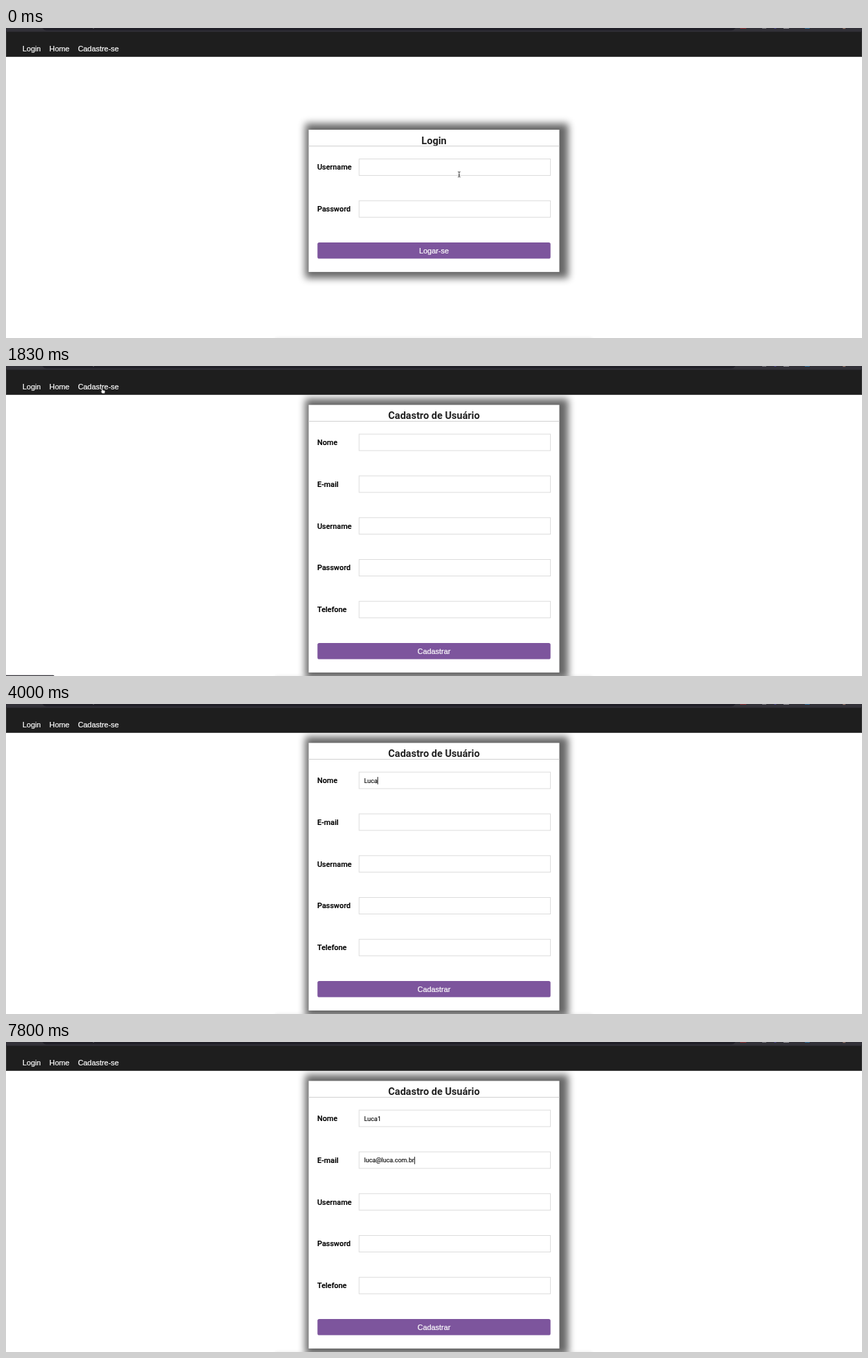
Write an HTML page that moves like this. It is 1243 by 451 pixels and loops after 8 s.

```html
<!DOCTYPE html>
<html lang="pt-BR">
<head>
<meta charset="utf-8">
<title>Cadastro</title>
<style>
  html, body { margin: 0; width: 100%; height: 100%; overflow: hidden; background: #fff; }
  svg { display: block; width: 1243px; height: 451px; }
  text { white-space: pre; }
  .nav { font: 10.92px "Liberation Sans", Arial, sans-serif; fill: #fff; stroke: #fff; stroke-width: .22; }
  .title { font: 700 14.57px Roboto, sans-serif; fill: #212121; text-anchor: middle; }
  .label { font: 500 10.92px Roboto, sans-serif; fill: #000; stroke: #000; stroke-width: .2; }
  .typed { font: 9.1px Roboto, sans-serif; fill: #000; stroke: #000; stroke-width: .12; }
  .item { font: 600 6.1px Inter, sans-serif; fill: #f1f1f3; }
  .mid { text-anchor: middle; }
  .field { fill: #fff; stroke: #dcdcdc; }
</style>
</head>
<body>
<svg id="stage" viewBox="0 0 1243 451">
  <defs>
    <filter id="glow" x="-20%" y="-20%" width="140%" height="140%"><feGaussianBlur stdDeviation="5.500"/></filter>
    <filter id="soft" x="-20%" y="-300%" width="140%" height="700%"><feGaussianBlur stdDeviation="2"/></filter>
    <filter id="drop" x="-10%" y="-20%" width="120%" height="150%"><feGaussianBlur stdDeviation=".8"/></filter>
  </defs>

  <g id="login"></g>
  <g id="signup"></g>

  <g id="bar">
    <rect width="1243" height="6" fill="#323138"/>
    <path d="M53 0H1059Q1057 3.600 1053 3.600H59Q55 3.600 53 0Z" fill="#201f27"/>
    <rect x="126" width="2" height="1" fill="#4d4c53"/>
    <rect id="badge" x="1066" width="9" height="1" fill="#8c3032"/>
    <rect x="1098" width="6" height="1" fill="#77767c"/>
    <rect x="1115.500" width="3" height="1" fill="#4a4590"/>
    <rect x="1129" width="8" height="1" fill="#8f8e94"/>
    <rect x="1160" width="7" height="1" fill="#2c6a98"/>
    <rect x="1215" width="4" height="1.200" fill="#937568"/>
    <rect y="5.500" width="1243" height="36.500" fill="#1e1e1e"/>
    <path d="M.4 6V41.600H1242.600V6" fill="none" stroke="#444" stroke-width=".7"/>
    <g class="nav">
      <text x="24" y="34">Login</text>
      <text x="63" y="34">Home</text>
      <text x="104.400" y="34">Cadastre-se</text>
    </g>
  </g>

  <rect x="391" y="451" width="460" height="5" fill="#000" opacity=".09" filter="url(#soft)"/>
  <path id="status" d="M0 449.700H68Q70 449.700 70 451H0Z" fill="#38373d"/>

  <g id="entry">
    <text id="name" class="typed" x="520"></text>
    <text id="mail" class="typed" x="520"></text>
    <rect id="caret" width=".9" height="10.800"/>
  </g>
  <g id="allNames"></g>
  <g id="oneName"></g>
  <g id="oneMail"></g>

  <g id="cursor">
    <path id="arrow" d="M0 0V7.100L1.700 5.600L2.800 8.100L4 7.600L2.900 5.200H5.200Z" fill="#000" stroke="#fff" stroke-width=".7"/>
    <path id="hand" d="M-.9 .6Q0 -.4 .8 .6V2.700L3.200 3.100Q4.400 3.400 4.300 4.700L3.700 7.600H-.2L-2 4.800Q-2 3.800 -.9 4.400Z" fill="#fff" stroke="#222" stroke-width=".6"/>
    <path id="beam" d="M-1.900 -3.900Q0 -3.900 0 -2.900Q0 -3.900 1.900 -3.900M0 -3V3M-1.900 3.900Q0 3.900 0 2.900Q0 3.900 1.900 3.900M-1 .9H1" fill="none" stroke="#222" stroke-width=".8"/>
  </g>
</svg>
<script>
const LOOP = 8000, PITCH = 60.8;
const $ = id => document.getElementById(id);
const show = (id, on) => $(id).setAttribute('visibility', on ? 'visible' : 'hidden');
const within = (t, a, b) => t >= a && t < b;

function card(id, top, title, labels, action) {
  const first = top + 42.5, bottom = first + PITCH * labels.length;
  const height = bottom + 42.8 - top;
  const rows = labels.map((label, i) => {
    const y = first + i * PITCH;
    return `<text class="label" x="452" y="${y + 15.8}">${label}</text>
      <rect class="field" x="512.8" y="${y}" width="277.800" height="24"/>`;
  }).join('');
  $(id).innerHTML = `
    <rect x="434.500" y="${top - 9}" width="382" height="${height + 18}" opacity=".6" filter="url(#glow)"/>
    <rect x="439.500" y="${top}" width="364" height="${height}" fill="#fff"/>
    <text class="title" x="621.500" y="${top + 20.7}">${title}</text>
    <path d="M439.500 ${top + 23.8}h364" stroke="#cecece"/>
    ${rows}
    <rect x="452.300" y="${bottom - .1}" width="338.400" height="23.600" rx="2.600" fill="#7d559d"/>
    <text class="nav mid" x="621.500" y="${bottom + 15.8}">${action}</text>`;
}

function list(id, y, items) {
  const box = `x="512.800" width="93.200" height="${8 + 17.5 * items.length}" rx="2"`;
  $(id).innerHTML = `<rect ${box} y="${y + .8}" opacity=".45" filter="url(#drop)"/>
    <rect ${box} y="${y}" fill="#232228"/>` +
    items.map((s, i) => `<text class="item" x="518.500" y="${y + 15 + i * 17.5}">${s}</text>`).join('');
}

const LOGIN_TOP = 148, SIGNUP_TOP = 56.6;
const NAME_Y = SIGNUP_TOP + 42.5, MAIL_Y = NAME_Y + PITCH;
card('login', LOGIN_TOP, 'Login', ['Username', 'Password'], 'Logar-se');
card('signup', SIGNUP_TOP, 'Cadastro de Usuário',
  ['Nome', 'E-mail', 'Username', 'Password', 'Telefone'], 'Cadastrar');
list('allNames', 124, ['Camilla', 'Camilla Brás Valdelinhas', 'Camilal', 'Camilla2', 'Cami', 'asd']);
list('oneName', 124, ['Luca']);
list('oneMail', 184.6, ['luca@luca.com.br']);
$('name').setAttribute('y', NAME_Y + 15.5);
$('mail').setAttribute('y', MAIL_Y + 15.5);

// One time per typed character
const NAME = ['Luca1', [3570, 3670, 3800, 4000, 4570]];
const MAIL = ['luca@luca.com.br', [5330, 5470, 5570, 5830, 6270, 6530, 6670, 6700,
  6900, 7100, 7200, 7300, 7400, 7600, 7700, 7800]];
const typed = ([text, times], t) => text.slice(0, times.filter(k => k <= t).length);

// Pointer stops: time, x, y
const PATH = [[0, 658, 213], [200, 653, 210], [530, 653, 210], [930, 176.5, 36],
  [1130, 150, 28], [1330, 140.4, 33], [1360, 140.4, 33], [1400, 139.7, 32.3],
  [1830, 139.7, 32.3], [2430, 544.5, 111]];

function pointer(t) {
  const i = PATH.findIndex(p => p[0] > t);
  if (i < 0) return PATH[PATH.length - 1].slice(1);
  const [a, x, y] = PATH[i - 1], [b, u, v] = PATH[i];
  const k = (t - a) / (b - a), e = k * k * (3 - 2 * k);
  return [x + (u - x) * e, y + (v - y) * e];
}

function drawPointer(t) {
  const [x, y] = pointer(t), on = t < 3570;
  const top = t < 1830 ? LOGIN_TOP + 42.5 : NAME_Y;
  const field = within(x, 512.8, 790.6) && within(y, top, top + 24);
  const link = within(x, 104, 164) && within(y, 24, 38);
  $('cursor').setAttribute('transform', `translate(${x} ${y})`);
  show('beam', on && field);
  show('hand', on && link);
  show('arrow', on && !field && !link);
}

function drawEntry(t) {
  const inMail = t >= 5100;
  const name = $('name'), mail = $('mail'), caret = $('caret');
  name.textContent = typed(NAME, t);
  mail.textContent = typed(MAIL, t);
  const text = inMail ? mail : name;
  const width = text.textContent ? text.getComputedTextLength() : 0;
  caret.setAttribute('x', 520 + width);
  caret.setAttribute('y', (inMail ? MAIL_Y : NAME_Y) + 7);
  show('caret', within(t, 2470, 3000) || within(t, 3500, 4500) || within(t, 4570, 5070) || inMail);
}

function draw(t) {
  const signup = t >= 1830;
  show('login', !signup);
  show('signup', signup);
  show('badge', !within(t, 1630, 1960));
  show('status', within(t, 1230, 2060));
  show('allNames', within(t, 2500, 3570));
  show('oneName', within(t, 3600, 4000));
  show('oneMail', within(t, 5370, 7800));
  drawEntry(t);
  drawPointer(t);
}

let start;
function tick(now) {
  start ??= now;
  draw((now - start) % LOOP);
  requestAnimationFrame(tick);
}
draw(0);
requestAnimationFrame(tick);
</script>
</body>
</html>
```
